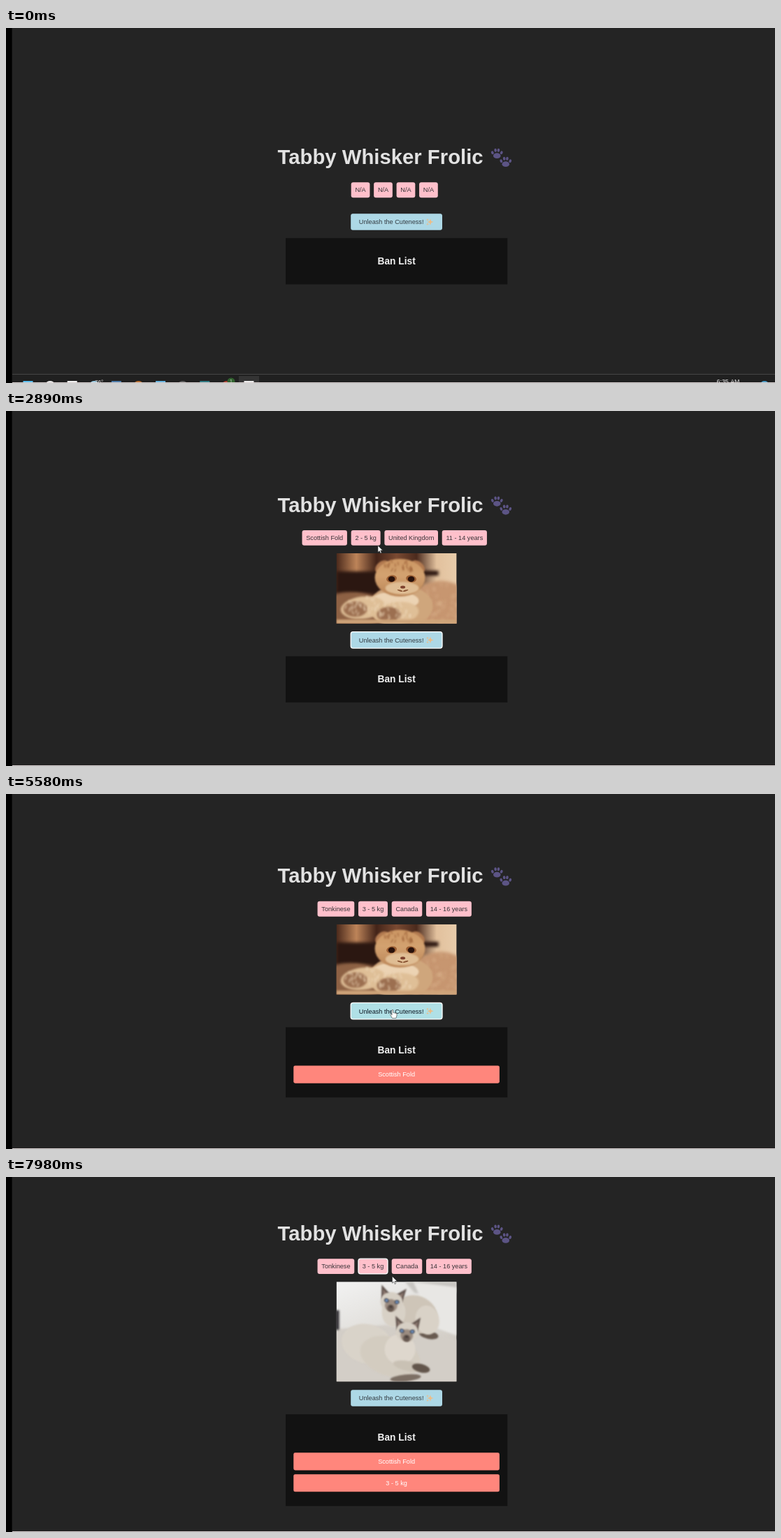
Write an HTML page with a canvas that moves like this. It is 1100 by 509 pixels and loops after 8000 ms.

```html
<!DOCTYPE html>
<html lang="en">
<head>
<meta charset="utf-8">
<title>Tabby Whisker Frolic</title>
<style>
html, body { margin: 0; width: 100%; height: 100%; overflow: hidden; background: #242424; }
canvas { display: block; }
</style>
</head>
<body>
<canvas id="stage" width="1100" height="509"></canvas>
<script>
const ctx = document.getElementById('stage').getContext('2d');
const LOOP = 8000, TICK = 67;
const FONT = '"Liberation Sans", Arial, sans-serif';
const CENTER = 558.6, MIDDLE = 276;
const TEXT = 9.17, PAD = 5.73;
const PHOTO_W = 172;

const EMPTY = Array(4).fill('N/A');
const FOLD = ['Scottish Fold', '2 - 5 kg', 'United Kingdom', '11 - 14 years'];
const TONK = ['Tonkinese', '3 - 5 kg', 'Canada', '14 - 16 years'];

// Each entry changes some fields of the page from its time on.
const events = [
  { at: 0, chips: EMPTY, photo: null, photoH: 0, bans: [], focus: '' },
  { at: 1340, focus: 'button' },
  { at: 1740, chips: FOLD },
  { at: 1870, photo: foldPhoto, photoH: 100.7 },
  { at: 3700, focus: FOLD[0] },
  { at: 3830, bans: [FOLD[0]] },
  { at: 5180, focus: 'button' },
  { at: 5250, chips: TONK },
  { at: 5640, photo: tonkPhoto, photoH: 143.2 },
  { at: 7590, focus: TONK[1] },
  { at: 7720, bans: [FOLD[0], TONK[1]] }
];

// The pointer goes from the last place to x, y between two times.
const moves = [
  { from: 120, to: 860, x: 634, y: 272 },
  { from: 930, to: 1140, x: 577, y: 282 },
  { from: 2350, to: 2890, x: 532, y: 193 },
  { from: 2957, to: 3090, x: 474, y: 177 },
  { from: 3160, to: 3230, x: 465, y: 184 },
  { from: 4160, to: 4450, x: 540, y: 290.5 },
  { from: 4720, to: 4980, x: 553, y: 309 },
  { from: 6110, to: 6510, x: 523.5, y: 191 },
  { from: 6577, to: 6710, x: 511, y: 166 },
  { from: 6850, to: 7050, x: 507, y: 145 },
  { from: 7250, to: 7390, x: 527, y: 147 },
  { from: 7850, to: 7980, x: 552.5, y: 142.5 }
];

function stateAt(t) {
  return Object.assign({}, ...events.filter(e => e.at <= t));
}

// The screen was sampled at a fixed rate, so every move runs in even steps.
function pointerAt(t) {
  if (t < moves[0].from) return null;
  let p = { x: 706, y: 512 };
  for (const m of moves) {
    if (t < m.from) break;
    const span = Math.round((m.to - m.from) / TICK);
    const step = Math.floor((t - m.from) / (m.to - m.from) * span + 0.01) + 1;
    const k = Math.min(1, step / (span + 1));
    p = { x: p.x + (m.x - p.x) * k, y: p.y + (m.y - p.y) * k };
  }
  return p;
}

function seeded(seed) {
  return () => (seed = seed * 16807 % 2147483647) / 2147483647;
}

function rect(x, y, w, h, color) {
  ctx.fillStyle = color;
  ctx.fillRect(x, y, w, h);
}

function round(x, y, w, h, r, color) {
  ctx.beginPath();
  ctx.roundRect(x, y, w, h, r);
  ctx.fillStyle = color;
  ctx.fill();
}

function oval(x, y, rx, ry, color, turn = 0) {
  ctx.beginPath();
  ctx.ellipse(x, y, rx, ry, turn, 0, 7);
  ctx.fillStyle = color;
  ctx.fill();
}

function shape(path, color) {
  ctx.fillStyle = color;
  ctx.fill(new Path2D(path));
}

function blend(w, h, ...colors) {
  const g = ctx.createLinearGradient(0, 0, w, h);
  colors.forEach((c, i) => g.addColorStop(i / (colors.length - 1), c));
  return g;
}

function text(str, x, y, color, align = 'center', size = TEXT, weight = '') {
  ctx.font = `${weight} ${size}px ${FONT}`;
  ctx.textAlign = align;
  ctx.fillStyle = color;
  ctx.fillText(str, x, y);
}

function ring(x, y, w, h) {
  ctx.beginPath();
  ctx.roundRect(x, y, w, h, 3.4);
  ctx.strokeStyle = '#fff';
  ctx.lineWidth = 1.3;
  ctx.stroke();
}

function paw(x, y) {
  const color = '#5c5485';
  oval(x, y + 3, 5.3, 3.9, color);
  for (let i = -1.5; i <= 1.5; i++) {
    oval(x + i * 4.3, y - 5.3 + i * i * 1.75, 1.8, 2.5, color, i * 0.25);
  }
}

function star(x, y, r) {
  ctx.beginPath();
  for (let i = 0; i < 8; i++) {
    const d = i % 2 ? r * 0.36 : r, a = i * Math.PI / 4;
    ctx.lineTo(x + d * Math.cos(a), y + d * Math.sin(a));
  }
  ctx.fillStyle = '#edbd87';
  ctx.fill();
}

// Short hairs scattered over an ellipse.
function fur(x, y, rx, ry, color, count, rnd) {
  ctx.strokeStyle = color;
  ctx.lineWidth = 1.2;
  for (let i = 0; i < count; i++) {
    const a = rnd() * 7, r = Math.sqrt(rnd());
    const hx = x + rx * r * Math.cos(a), hy = y + ry * r * Math.sin(a);
    ctx.beginPath();
    ctx.moveTo(hx, hy);
    ctx.lineTo(hx + rnd() * 6 - 3, hy - 5);
    ctx.stroke();
  }
}

function foldPhoto() {
  const rnd = seeded(11);
  rect(0, 0, 172, 101, blend(172, 0, '#4a291b', '#bd8459', '#432419', '#7a4a32', '#4b2a1d', '#e2c19d', '#e8ccab'));
  ctx.filter = 'blur(2px)';
  rect(0, 26, 62, 32, '#2b1711');
  rect(112, 25, 34, 7, '#29140e');
  oval(146, 76, 46, 36, '#c79670', -0.15);
  oval(20, 82, 50, 26, '#8d6144');
  fur(145, 76, 40, 32, '#e0b892', 90, rnd);
  ctx.filter = 'blur(1px)';
  oval(92, 76, 46, 30, '#cfa67c');
  oval(84, 68, 34, 13, '#ecd3b3');
  for (const s of [-1, 1]) oval(91 + s * 26, 19, 11, 7, '#b27a50', s * 0.7);
  oval(91, 35, 36, 27, blend(0, 64, '#c9925f', '#d3a270', '#b98355'));
  oval(94, 50, 24, 9, '#dfbd94');
  fur(90, 22, 24, 9, '#a56b41', 24, rnd);
  ctx.filter = 'blur(0.5px)';
  for (const s of [-1, 1]) {
    oval(93 + s * 14, 36.5, 7.5, 5, '#9c6035', s * 0.2);
    oval(93 + s * 14, 37, 4.8, 4, '#28110b');
    oval(95 + s * 4, 53.5, 4, 1, '#85502f', s * -0.3);
  }
  oval(95, 48.5, 3.5, 2, '#7c402d');
  ctx.filter = 'blur(1.5px)';
  for (const [x, y] of [[34, 78], [82, 86]]) {
    oval(x + 4, y, 32, 16, '#dfbf97', -0.12);
    oval(x - 7, y + 2, 17, 11, '#9c6f50');
    fur(x, y, 28, 13, '#f0d9ba', 30, rnd);
  }
  rect(0, 95, 172, 6, '#cfa57a');
}

function siamese(x, y, tilt) {
  ctx.save();
  ctx.translate(x, y);
  ctx.rotate(tilt);
  for (const s of [-1, 1]) {
    ctx.save();
    ctx.scale(s, 1);
    shape('M15 -1 L18 -22 L4 -11 Z', '#61544e');
    shape('M13 -4 L15 -16 L7 -10 Z', '#8b776e');
    ctx.restore();
  }
  oval(0, 0, 16, 14, '#d6cfc4');
  oval(0, 5, 9, 9, '#9b8c81');
  oval(0, 9, 5, 5, '#665850');
  for (const s of [-1, 1]) {
    oval(s * 7.5, -1, 3.5, 2.8, '#4c4b51', s * -0.3);
    oval(s * 7.5, -1, 2.2, 2, '#6c91c3');
  }
  oval(0, 7, 2, 1.2, '#39302e');
  ctx.restore();
}

function tonkPhoto() {
  rect(0, 0, 172, 144, blend(60, 144, '#f2f2f2', '#e2e0dc', '#cdc7bf'));
  ctx.filter = 'blur(1.5px)';
  shape('M98 0 H172 V16 H112 Z', '#c8c6c2');
  shape('M110 0 L172 8 V77 L139 65 Z', '#e8e7e4');
  shape('M0 68 L70 62 L172 83 V144 H0 Z', '#d3cec7');
  rect(-2, 41, 6, 28, '#343236');
  ctx.filter = 'blur(0.8px)';
  oval(132, 76, 14, 6, '#685a50', 0.2);
  oval(113, 47, 32, 27, '#cec5b8', 0.35);
  oval(130, 55, 17, 21, '#d9d2c7', -0.2);
  oval(82, 44, 17, 21, '#d8d1c6');
  siamese(79, 29, 0.16);
  oval(44, 89, 37, 28, '#d9d3c9', 0.25);
  oval(77, 107, 44, 28, '#d3ccc0', 0.3);
  oval(91, 97, 22, 22, '#ded7cd');
  oval(103, 121, 22, 7, '#c9c1b4', 0.2);
  oval(121, 124, 13, 6, '#62554b', 0.25);
  oval(99, 138, 22, 5, '#7c6f64', -0.1);
  siamese(101, 72, 0.07);
}

function taskbar() {
  const icons = ['#5bbff0', '#eeeeee', '#f2f2f2', '#a3d3e9', '#4f7dab', '#bd7132',
    '#68b4df', '#626262', '#347d87', '#b54435', '#eeeeee'];
  rect(9, 496, 1091, 13, '#202020');
  rect(9, 496, 1091, 1, '#454545');
  rect(333, 499, 29, 10, '#343434');
  icons.forEach((color, i) => {
    const x = 31.5 + i * 31.6;
    if (i % 2) oval(x, 510, 6, 4, color);
    else rect(x - 7, 506, 14, 3, color);
  });
  oval(322, 507, 5.5, 5.5, '#31622f');
  text('1', 322, 509, '#d6e7d2', 'center', 7);
  text('76°', 127, 510, '#e5e5e5', 'left', 8);
  text('6:35 AM', 1033, 510, '#e8e8e8', 'center', 8.8);
  oval(1085, 511, 6, 5, '#4c9fca');
}

function drawPointer(p, hand) {
  const path = new Path2D(hand
    ? 'M-1 1 Q0 -1 1 1 V4.5 L6 5.6 V9 L4.8 12.5 H-.5 L-3.3 7.5 L-2.4 6.5 L-1 8 Z'
    : 'M0 0 V9.6 L2.2 7.6 L3.7 11 L5.2 10.3 L3.8 7 L6.8 6.8 Z');
  ctx.save();
  ctx.translate(p.x, p.y);
  ctx.fillStyle = '#fff';
  ctx.fill(path);
  ctx.strokeStyle = '#333';
  ctx.lineWidth = 0.6;
  ctx.stroke(path);
  ctx.restore();
}

function drawPhoto(s, y) {
  const x = CENTER - PHOTO_W / 2;
  ctx.save();
  ctx.beginPath();
  ctx.rect(x, y, PHOTO_W, s.photoH);
  ctx.clip();
  ctx.translate(x, y);
  s.photo();
  ctx.restore();
}

function draw(t) {
  const s = stateAt(t), p = pointerAt(t);
  const n = s.bans.length;
  const banH = 66.3 + (n ? 3.4 + n * 30.9 : 0);
  const top = MIDDLE - (116.8 + s.photoH + banH) / 2;
  const chipY = top + 36.9, photoY = chipY + 33;
  const buttonY = photoY + s.photoH + 11.9, banY = buttonY + 35;
  let hand = false;

  // A box with optional focus ring; tells whether the pointer is over it.
  const box = (x, y, w, h, color, hotColor, focused) => {
    const hot = !!p && p.x >= x && p.x <= x + w && p.y >= y && p.y <= y + h;
    hand = hand || hot;
    round(x, y, w, h, 3, hot ? hotColor : color);
    if (focused) ring(x, y, w, h);
    return hot;
  };

  rect(0, 0, 1100, 509, '#242424');
  text('Tabby Whisker Frolic', 388.5, top + 10.5, '#e2e2e2', 'left', 29.3, 'bold');
  paw(702.3, top - 4.3);
  paw(714.8, top + 7.7);

  ctx.font = `${TEXT}px ${FONT}`;
  const widths = s.chips.map(c => ctx.measureText(c).width + 2 * PAD);
  let x = CENTER - (widths.reduce((a, b) => a + b) + 4 * PAD) / 2;
  s.chips.forEach((label, i) => {
    const w = widths[i];
    const hot = box(x, chipY, w, 21.8, '#ffc0cb', '#ffc0cb', s.focus === label);
    text(label, x + w / 2, chipY + 14, hot ? '#0b0b12' : '#383338');
    x += w + PAD;
  });

  if (s.photo) drawPhoto(s, photoY);

  const hot = box(493.2, buttonY, 130.8, 23.5, '#add8e6', '#b0e0e6', s.focus === 'button');
  text('Unleash the Cuteness!', 504.8, buttonY + 15.2, hot ? '#0b1420' : '#333a40', 'left');
  star(607, buttonY + 11.8, 4.6);
  star(603, buttonY + 8.8, 2);
  star(603, buttonY + 15, 2);

  rect(400, banY, 317.3, banH, '#121212');
  text('Ban List', CENTER, banY + 37.8, '#f0f0f0', 'center', 13.75, 'bold');
  s.bans.forEach((label, i) => {
    const y = banY + 55 + i * 30.9;
    round(411.3, y, 294.6, 25.2, 2.4, '#ff867c');
    text(label, CENTER, y + 15.6, '#fff');
  });

  if (t < 120) taskbar();
  rect(9, 508, 1091, 1, '#d9d0d0');
  rect(0, 0, 8.6, 509, '#000');
  if (p) drawPointer(p, hand);
}

function frame() {
  draw(performance.now() % LOOP);
  requestAnimationFrame(frame);
}
frame();
</script>
</body>
</html>
```
